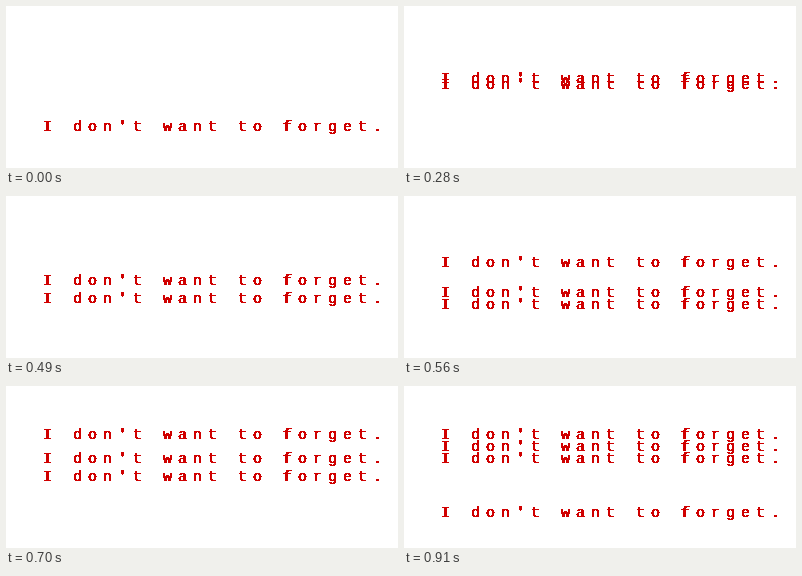
Write an HTML page with a canvas that moves like this. It is 392 by 162 pixels and loops after 980 ms.

```html
<!DOCTYPE html>
<html>
<head>
<meta charset="utf-8">
<style>
html, body { margin: 0; width: 100%; height: 100%; overflow: hidden; background: #fff; }
canvas { display: block; }
</style>
</head>
<body>
<canvas id="stage" width="392" height="162"></canvas>
<script>
const TEXT = "I don't want to forget.";
const STEP_MS = 70, STEPS = 14;
const WIDTH = 392, HEIGHT = 162;
const LEFT = 41, PITCH = 15, BASELINE = 16;
const TOP = 48, GRID = 6, STACK_GAP = 12;

// Lines appear one after another, rise, and stack up under the top edge.
const lines = [
  { born: 0, from: 120, speed: 12 },
  { born: 4, from: 78, speed: -15, pull: 4.5 },
  { born: 6, from: 114, speed: 10.5 },
  { born: 8, from: 108, speed: 9 },
  { born: 13, from: 126, speed: 12 }
];

// One hard-edged line of text; the doubled stroke thickens only the stems.
function makeLine() {
  const sprite = document.createElement("canvas");
  sprite.width = WIDTH;
  sprite.height = 24;
  const g = sprite.getContext("2d");
  g.font = "15px 'Liberation Mono', monospace";
  g.textAlign = "center";
  g.fillStyle = "#d00000";
  [...TEXT].forEach((letter, i) => {
    const x = LEFT + i * PITCH;
    g.fillText(letter, x, BASELINE);
    g.fillText(letter, x + 1, BASELINE);
  });
  const image = g.getImageData(0, 0, WIDTH, sprite.height);
  for (let i = 3; i < image.data.length; i += 4) {
    image.data[i] = image.data[i] > 120 ? 255 : 0;
  }
  g.putImageData(image, 0, 0);
  return sprite;
}

function heightOf({ from, speed, pull = 0 }, age, slot) {
  const y = from - speed * age - pull * age * age;
  return Math.max(TOP + slot * STACK_GAP, Math.round(y / GRID) * GRID);
}

const ctx = document.getElementById("stage").getContext("2d");
const sprite = makeLine();

function draw() {
  const step = Math.floor(performance.now() / STEP_MS) % STEPS;
  ctx.fillStyle = "#fff";
  ctx.fillRect(0, 0, WIDTH, HEIGHT);
  lines.forEach((line, i) => {
    const age = step - line.born;
    // The first line has no slot in the stack and leaves past the top.
    const y = heightOf(line, age, i - 1);
    if (age >= 0 && y >= TOP) ctx.drawImage(sprite, 0, y + 5 - BASELINE);
  });
  requestAnimationFrame(draw);
}
draw();
</script>
</body>
</html>
```
